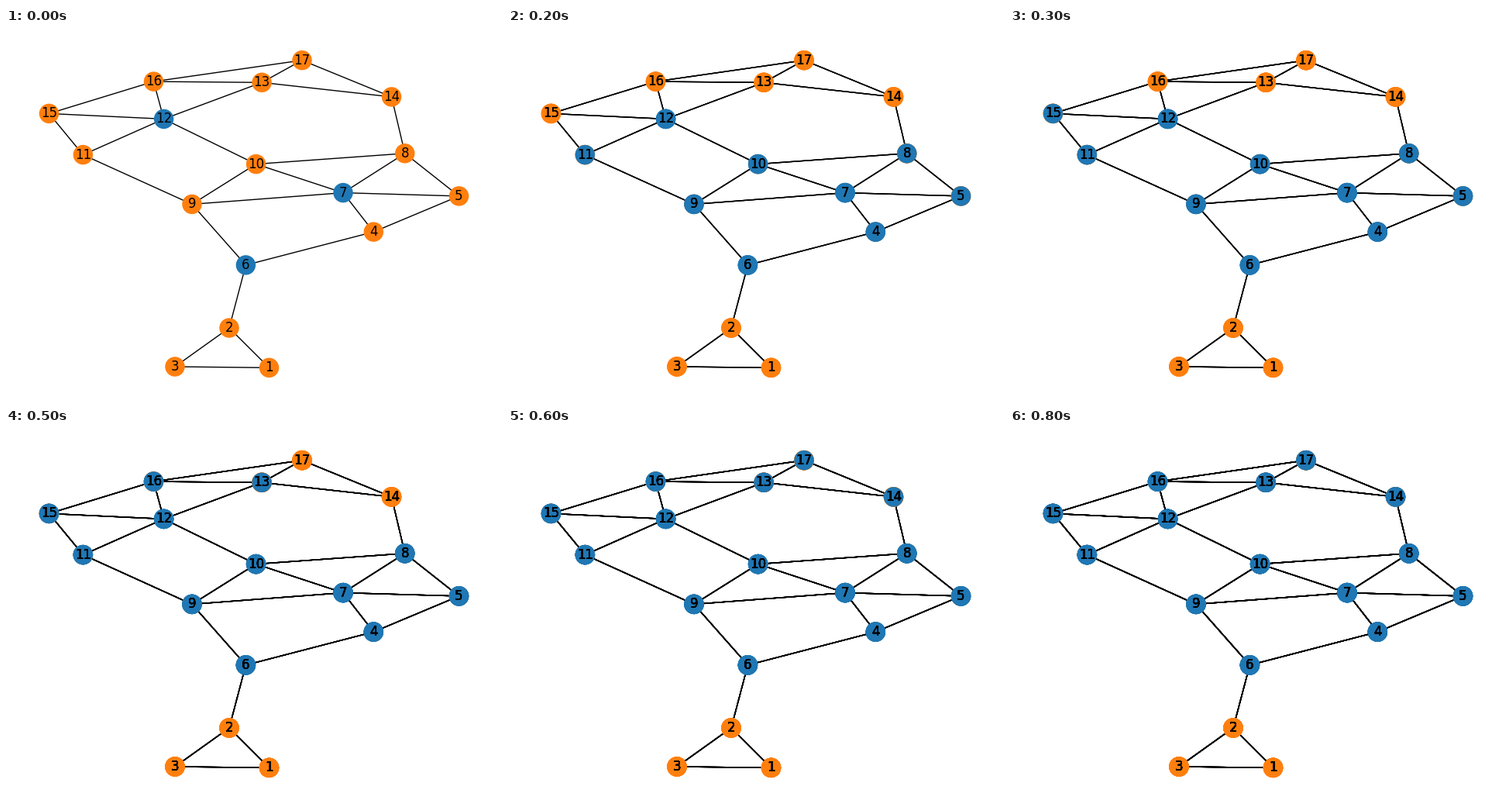
A matplotlib script that plays this animation: 640 by 480 pixels, repeating every 900 ms.

```python
import matplotlib.pyplot as plt
from matplotlib.animation import ArtistAnimation
from matplotlib.collections import LineCollection

W, H, DPI = 640, 480, 100
STEPS, STEP_MS = 9, 100
ACTIVE, IDLE = "#1f77b4", "#ff7f0e"

# Layout margins: the graph fills the stage shrunk by 1.1 twice.
LEFT, TOP = (W - W / 1.21) / 2, (H - H / 1.21) / 2
RIGHT, BOTTOM = W - LEFT, H - TOP

POINTS = [
    (339.5, BOTTOM), (288, 387), (218, 437), (474.3, 263.1), (RIGHT, 216.9),
    (309.4, 305.9), (435, 212.6), (514.7, 161.8), (240, 227.4),
    (322.6, 175.6), (99.4, 163.6), (203.6, 117.4), (330.1, 70.3),
    (497.5, 88.9), (LEFT, 110.4), (190.5, 69.1), (382, TOP),
]
POS = dict(enumerate(POINTS, start=1))

# Walks through the graph; together they pass every edge once.
WALKS = [
    "2 1 3 2 6 9 11 15 16 17 14 8 5 4 6",
    "15 12 16 13 17",
    "11 12 13 14",
    "12 10 8 7 4",
    "5 7 9 10 7",
]
EDGES = [(int(a), int(b)) for walk in map(str.split, WALKS)
         for a, b in zip(walk, walk[1:])]
NEAR = {n: [a + b - n for a, b in EDGES if n in (a, b)] for n in POS}


def spread(active):
    """A node joins once at least half of its neighbours are active."""
    return active | {n for n, near in NEAR.items()
                     if 2 * sum(m in active for m in near) >= len(near)}


def draw_graph(ax, active):
    lines = LineCollection([(POS[a], POS[b]) for a, b in EDGES],
                           colors="black", linewidths=1, zorder=1)
    ax.add_collection(lines)
    xs, ys = zip(*POINTS)
    colors = [ACTIVE if n in active else IDLE for n in POS]
    dots = ax.scatter(xs, ys, s=300, c=colors, zorder=2)
    labels = [ax.text(x, y, str(n), size=12, family="DejaVu Sans",
                      ha="center", va="center", zorder=3)
              for n, (x, y) in POS.items()]
    return [lines, dots, *labels]


fig = plt.figure(figsize=(W / DPI, H / DPI), dpi=DPI, facecolor="white")
ax = fig.add_axes([0, 0, 1, 1])
ax.set_axis_off()

# Each step paints over the earlier ones, so soft edges grow darker.
active, painted, frames = {6, 7, 12}, [], []
for _ in range(STEPS):
    painted = painted + draw_graph(ax, active)
    frames.append(painted)
    active = spread(active)

ax.set_xlim(0, W)
ax.set_ylim(H, 0)

anim = ArtistAnimation(fig, frames, interval=STEP_MS, repeat=True,
                       repeat_delay=0, blit=False)
plt.show()
```
